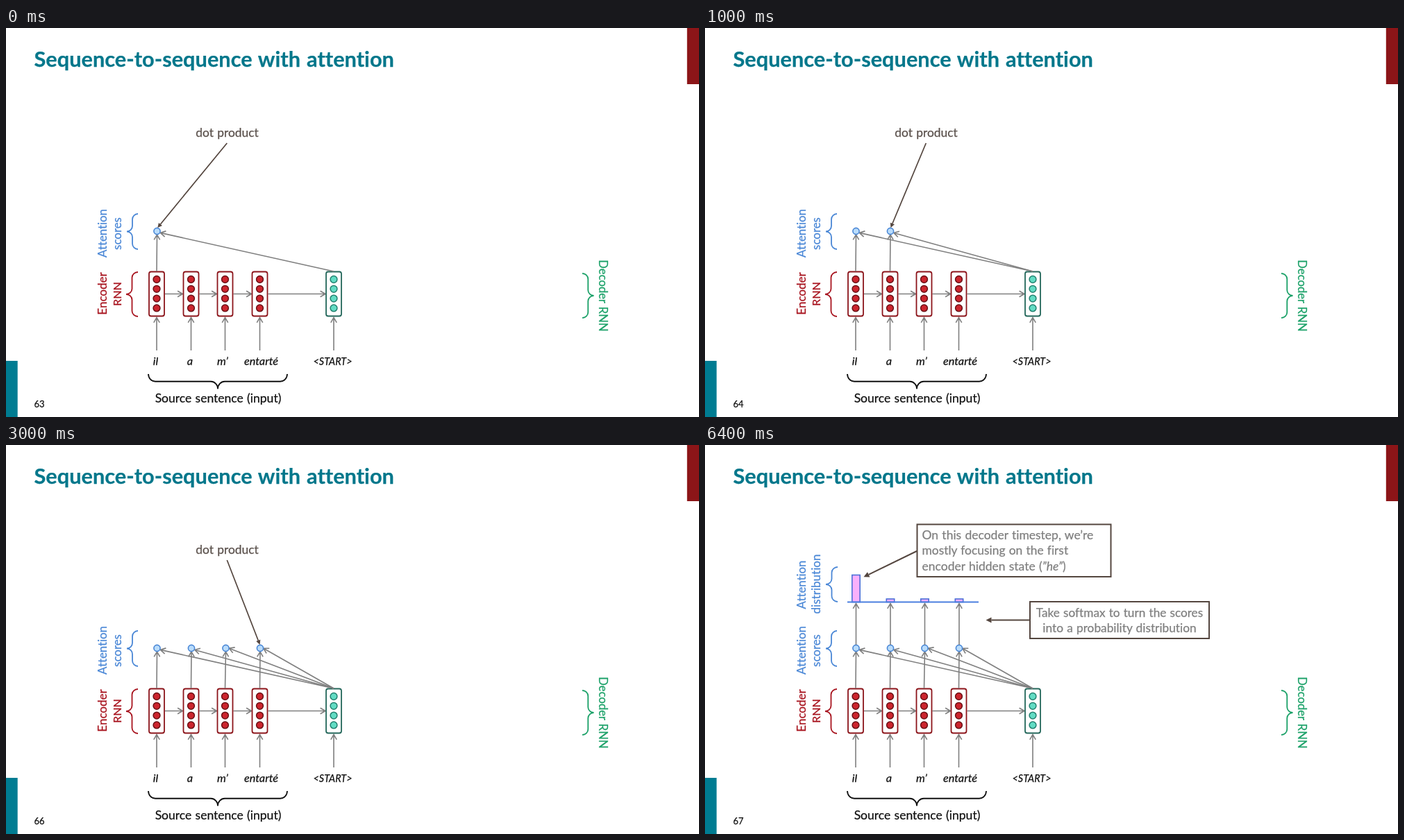
An HTML page for the animation above (8000 ms loop, 998x561 px).

```html
<!DOCTYPE html>
<html lang="en">
<head>
<meta charset="utf-8">
<title>Sequence-to-sequence with attention</title>
<style>
  html, body { margin: 0; width: 100%; height: 100%; overflow: hidden; background: #fff; }
  svg { display: block; width: 100%; height: 100%; }
  text {
    font-family: Lato, "Open Sans", sans-serif;
    font-variant-ligatures: none;
    word-spacing: .045em;
    white-space: pre;
    stroke-width: .25;
  }
</style>
</head>
<body>
<svg id="stage" viewBox="0 0 998 561"></svg>
<script>
const LOOP = 8000, STEP = 1000, LAST = 4;
const GRAY = '#7f7f7f', BROWN = '#54463f', BLUE = '#4a87d6', RED = '#a8141f', GREEN = '#1ba168';
const TEAL = '#007c92', INK = '#111';
const cols = [217, 266.5, 315.5, 365.5];
const scores = [217.5, 267, 316.5, 366];
const SCORE_Y = 293, DEC_X = 472, DOT_X = 318.3;
const stage = document.getElementById('stage');

function add(parent, tag, attrs, content) {
  const el = document.createElementNS('http://www.w3.org/2000/svg', tag);
  for (const k in attrs) el.setAttribute(k, attrs[k]);
  if (content !== undefined) el.textContent = content;
  return parent.appendChild(el);
}
const group = (parent = stage) => add(parent, 'g', {});
const rect = (g, x, y, width, height, attrs) => add(g, 'rect', { x, y, width, height, ...attrs });
const path = (g, d, stroke, w) => add(g, 'path', { d, stroke, 'stroke-width': w, fill: 'none' });

// The hairline stroke gives the text its slightly heavier weight
function label(g, str, x, y, size, fill, attrs) {
  return add(g, 'text', { x, y, 'font-size': size, fill, stroke: fill, 'text-anchor': 'middle', ...attrs }, str);
}
function turned(g, str, x, y, size, fill, angle = -90) {
  label(g, str, 0, 0, size, fill, { transform: `translate(${x} ${y}) rotate(${angle})` });
}

// Thin line with an open, two-stroke head
function arrow(g, x1, y1, x2, y2) {
  const a = Math.atan2(y2 - y1, x2 - x1);
  const wing = s => `${x2 - 8.5 * Math.cos(a + s)} ${y2 - 8.5 * Math.sin(a + s)}`;
  path(g, `M${x1} ${y1}L${x2} ${y2}M${wing(.52)}L${x2} ${y2}L${wing(-.52)}`, GRAY, 1.6);
}

// Line with a solid triangular head
function pointer(g, x1, y1, x2, y2, w, len) {
  const a = Math.atan2(y2 - y1, x2 - x1), c = Math.cos(a), s = Math.sin(a);
  const bx = x2 - len * c, by = y2 - len * s, h = len / 2;
  path(g, `M${x1} ${y1}L${bx} ${by}`, BROWN, w);
  add(g, 'path', { d: `M${x2} ${y2}L${bx - h * s} ${by + h * c}L${bx + h * s} ${by - h * c}Z`, fill: BROWN });
}

// Curly brace with its tip at x, y, pointing left before rotation
function brace(g, x, y, half, depth, stroke, angle = 0, r = 8) {
  const m = depth / 2;
  const d = `M${depth} ${-half}A${m} ${r} 0 0 0 ${m} ${r - half}V${-r}A${m} ${r} 0 0 1 0 0` +
            `A${m} ${r} 0 0 1 ${m} ${r}V${half - r}A${m} ${r} 0 0 0 ${depth} ${half}`;
  path(g, d, stroke, 1.8).setAttribute('transform', `translate(${x} ${y}) rotate(${angle})`);
}

function cell(g, x, edge, fill, rim) {
  rect(g, x - 11, 351.5, 22, 64, { rx: 3, fill: '#fff', stroke: edge, 'stroke-width': 1.8 });
  for (let i = 0; i < 4; i++)
    add(g, 'circle', { cx: x, cy: 362.5 + 13.8 * i, r: 4.9, fill, stroke: rim, 'stroke-width': 1.5 });
}

function callout(g, x, y, w, h) {
  rect(g, x, y, w, h, { fill: '#fff', stroke: BROWN, 'stroke-width': 2 });
}

// Fixed parts
const left = { 'text-anchor': 'start' }, italic = { 'font-style': 'italic' };
const base = group();
rect(base, 980.8, 0, 17.2, 81, { fill: '#8c1518' });
rect(base, 0, 480, 16.7, 81, { fill: TEAL });
label(base, 'Sequence-to-sequence with attention', 40.5, 56, 30.75, '#02778b', { 'font-weight': 700, ...left });

turned(base, 'Attention', 145, 296, 16.8, BLUE);
turned(base, 'scores', 166, 296.5, 16.9, BLUE);
brace(base, 174, 293.5, 25.5, 16, BLUE);
turned(base, 'Encoder', 145, 383, 17, RED);
turned(base, 'RNN', 166, 383.5, 16.2, RED);
brace(base, 173, 384, 32, 17, RED);
turned(base, 'Decoder RNN', 854.3, 386, 16.7, GREEN, 90);
brace(base, 846.5, 386, 32, 16.5, GREEN, 180);
brace(base, 305, 520.5, 100, 21.5, INK, -90, 10);
label(base, 'Source sentence (input)', 305.5, 540, 17.55, INK);

['il', 'a', 'm’', 'entarté'].forEach((word, i) => {
  const x = cols[i];
  label(base, word, [215.5, 265, 312, 367.5][i], 486, 16.3, INK, italic);
  arrow(base, x, 465, x, 417.5);
  arrow(base, x + 12, 383.5, i < 3 ? cols[i + 1] - 12 : DEC_X - 12, 383.5);
  cell(base, x, '#8c151b', '#cc252e', '#6a1015');
});
label(base, '<START>', 470.5, 485.5, 14.4, INK, italic);
arrow(base, DEC_X, 465, DEC_X, 417.5);
cell(base, DEC_X, '#23675a', '#62dcc4', '#23806f');
const page = label(base, '', 40.5, 547, 13, INK, left);

// One dot product per encoder state
const score = scores.map((x, i) => {
  const g = group();
  arrow(g, cols[i], 351, x, 298);
  arrow(g, DEC_X, 351, x + 4.8, SCORE_Y + (i < 2 ? 2.4 : .2));
  add(g, 'circle', { cx: x, cy: SCORE_Y, r: 4.6, fill: '#b9dcfb', stroke: BLUE, 'stroke-width': 1.6 });
  return g;
});
const dotText = group();
label(dotText, 'dot product', 318.5, 157, 17.4, '#5a504b');
const dot = scores.map(x => {
  const g = group(dotText);
  pointer(g, DOT_X, 166, x + (DOT_X - x) * .008, 288, 1.7, 6.5);
  return g;
});

// Softmax result
const dist = group();
turned(dist, 'Attention', 145, 201.5, 16.8, BLUE);
turned(dist, 'distribution', 166, 200.5, 17.1, BLUE);
brace(dist, 174, 201, 25, 17, BLUE);
scores.forEach((x, i) => {
  const h = i ? 4.5 : 39;
  arrow(dist, x, 288, x, 228.5);
  rect(dist, x - 5.7, 226.5 - h, 11.4, h, { fill: '#f9b0fb', stroke: '#4a70d8', 'stroke-width': 1.6 });
});
path(dist, 'M205 226.5H394', '#4a7fe0', 1.8);
pointer(dist, 305, 153, 228.5, 190.3, 2, 8);
callout(dist, 305.5, 114.5, 279, 75.5);
label(dist, 'On this decoder timestep, we’re', 312.5, 136, 17.5, GRAY, left);
label(dist, 'mostly focusing on the first', 312.5, 158, 17.4, GRAY, left);
const line = label(dist, 'encoder hidden state (', 312.5, 180.5, 17.5, GRAY, left);
add(line, 'tspan', italic, '”he”');
add(line, 'tspan', {}, ')');
pointer(dist, 468, 252.5, 404.5, 252.5, 2, 8);
callout(dist, 468, 226, 258, 53);
label(dist, 'Take softmax to turn the scores', 597, 247.5, 17.2, GRAY);
label(dist, 'into a probability distribution', 597, 269.5, 17.3, GRAY);

const show = (el, on) => el.setAttribute('display', on ? 'inline' : 'none');

function draw(t) {
  const step = Math.min(LAST, Math.floor((t % LOOP) / STEP));
  page.textContent = 63 + step;
  score.forEach((g, i) => show(g, i <= step));
  dot.forEach((g, i) => show(g, i === step));
  show(dotText, step < LAST);
  show(dist, step === LAST);
}

function tick() {
  draw(performance.now());
  requestAnimationFrame(tick);
}
tick();
</script>
</body>
</html>
```
